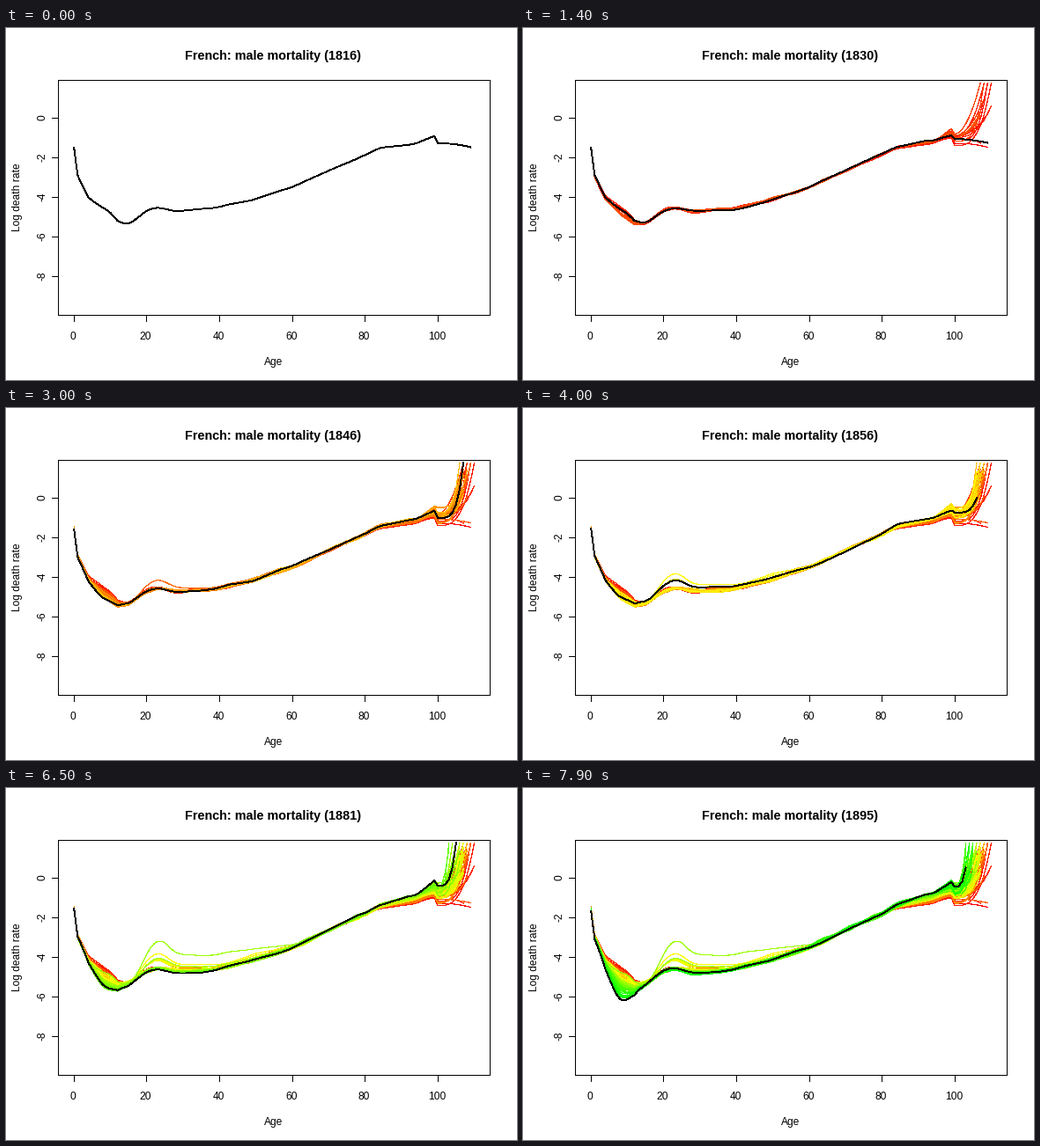
Write a matplotlib script that moves like this. It is 580 px wide and 400 px high and loops after 8 s.

```python
import colorsys

import matplotlib.pyplot as plt
import numpy as np
from matplotlib.animation import FuncAnimation

plt.rcParams["font.family"] = "Liberation Sans"
plt.rcParams["path.simplify"] = False

W, H, DPI = 580, 400, 100
PX = 72 / DPI
LEFT, RIGHT, TOP, BOTTOM = 59, 549, 59, 326
FIRST, COUNT = 1816, 80
V_MAX = 1.8
AGES = np.arange(100)

# Aliased strokes fill every pixel they touch, so widths stay below the look.
HAIR, RULE, BOLD = .1 * PX, .5 * PX, .9 * PX

# Typical log death rate by age.
SHAPE = [(0, -1.55), (1, -2.93), (4, -4.05), (8, -4.8), (12, -5.36), (15, -5.33),
         (20, -4.63), (23, -4.48), (28, -4.68), (39, -4.58), (48, -4.18),
         (60, -3.48), (72, -2.45), (84, -1.47), (94, -1.25), (99, -.75)]
# Severity of war and epidemic years.
CRISES = {1832: .4, 1854: .5, 1855: .65, 1856: .45, 1859: .4, 1870: .5, 1871: 1}


def bump(center, width):
    return np.exp(-((AGES - center) / width) ** 2 / 2)


def ramp(start, end):
    return np.clip((AGES - start) / (end - start), 0, 1)


def px_x(age):
    return 77.21 + 4.1306 * age


def px_y(rate):
    return 102.73 - 22.52 * rate


def typical():
    v = np.interp(AGES, *zip(*SHAPE))
    v[13:98] = np.convolve(v, [.25, .5, .25], "same")[13:98]
    return v


def old_age(i, start, rng):
    """Rates from age 100 on; most years shoot up, some early ones stay flat."""
    last = 110 - round(6 * i / COUNT) - rng.integers(0, 3)
    flat = i < 20 and i % 7 == 0
    end = start - .2 if flat else min(rng.uniform(0, 2.6), V_MAX)
    ages = np.arange(100, last + 1)
    t = (ages - 100) / (last - 100)
    return ages, start + (end - start) * t ** rng.uniform(1.8, 4.5)


def curve(i):
    rng = np.random.default_rng(FIRST + i)
    s = i / (COUNT - 1)
    v = typical()
    # Long trends: children gain, the very old lose.
    v -= (.5 * s + .74 * s ** 6) * bump(8, 3)
    v -= .15 * s ** 2 * bump(29, 6)
    v += .5 * s * ramp(80, 92)
    # Year-to-year variation.
    v += .05 * np.interp(AGES, np.linspace(0, 99, 15), rng.normal(0, 1, 15))
    v += .4 * (1 - s) * rng.random() ** 3 * bump(9.5, 2.7)
    v += rng.uniform(-.25, .25) * ramp(93, 99) ** 1.5
    # Crises hit young adults most, then fade with age.
    k = CRISES.get(FIRST + i, 0)
    v += .7 * k * bump(22.5, 3) + .6 * k ** 2 * bump(9.5, 2.7)
    v += .9 * k ** 2 * ramp(16, 25) * (1 - ramp(32, 68))
    ages, tail = old_age(i, v[99] - rng.uniform(.05, .4), rng)
    return px_x(np.append(AGES, ages)), px_y(np.append(v, tail))


fig = plt.figure(figsize=(W / DPI, H / DPI), dpi=DPI, facecolor="white")
ax = fig.add_axes([0, 0, 1, 1])
ax.set_xlim(0, W)
ax.set_ylim(H, 0)
ax.axis("off")


def stroke(x, y, **kw):
    return ax.plot(x, y, color="black", antialiased=False, **kw)[0]


def rule(x, y):
    stroke(x, y, lw=RULE, snap=True, solid_joinstyle="miter",
           solid_capstyle="projecting")


def label(x, y, s, size=12, **kw):
    return ax.text(x, y, s, fontsize=size * PX, ha="center", va="baseline",
                   rotation_mode="anchor", **kw)


rule([LEFT, RIGHT, RIGHT, LEFT, LEFT], [TOP, TOP, BOTTOM, BOTTOM, TOP])
for age in range(0, 101, 20):
    x = int(px_x(age))
    rule([x, x], [BOTTOM, BOTTOM + 7])
    label(x - .8, 354.5, str(age))
for rate in range(-8, 1, 2):
    y = int(px_y(rate))
    rule([LEFT - 7, LEFT], [y, y])
    label(44.5, y - .5, str(rate), rotation=90)
label(303.5, 383, "Age")
label(16, 191.8, "Log death rate", rotation=90)
title = label(303.2, 36, "", 14.4, weight="bold")

lines = [stroke(*curve(i), solid_joinstyle="round", zorder=3 + i / COUNT)
         for i in range(COUNT)]
colors = [colorsys.hsv_to_rgb(i / 238, 1, 1) for i in range(COUNT)]


def draw(n):
    title.set_text(f"French: male mortality ({FIRST + n})")
    for i, line in enumerate(lines):
        line.set_visible(i <= n)
        line.set_color("black" if i == n else colors[i])
        line.set_linewidth(BOLD if i == n else HAIR)
    return [title, *lines]


anim = FuncAnimation(fig, draw, frames=COUNT, interval=100, repeat=True, repeat_delay=0)
plt.show()
```
